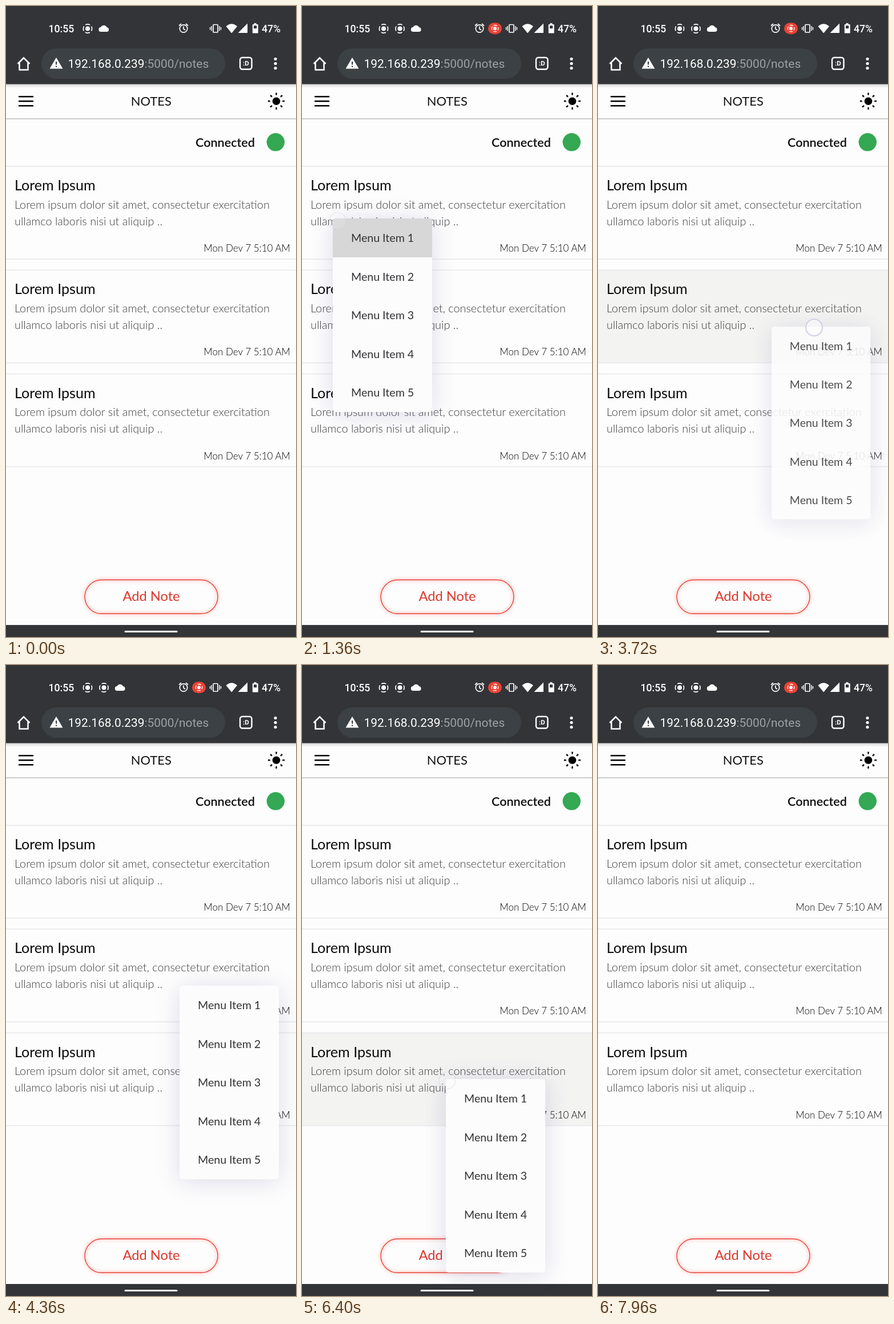
Animation, 508 px wide and 1102 px high, one loop 8000 ms. Source, as an HTML page:

```html
<!DOCTYPE html>
<html lang="en">
<head>
<meta charset="utf-8">
<title>Notes</title>
<style>
  html, body { margin: 0; width: 100%; height: 100%; overflow: hidden; background: #fdfdfd; }
  #stage { position: relative; width: 508px; height: 1102px; overflow: hidden; font-family: Lato, sans-serif; }
  svg { position: absolute; left: 0; top: 0; }
  .bar { font-family: Roboto, sans-serif; }
  .menu {
    position: absolute; width: 174px; border-radius: 5px; overflow: hidden;
    background: #fcfcfc; color: #333336; transform-origin: 0 0;
    box-shadow: 0 4px 40px rgba(85, 85, 150, .2);
  }
  .sub { width: 217px; }
  .menu div { height: 67.6px; line-height: 67px; padding-left: 32px; font-size: 19.6px; white-space: pre; }
  .touch {
    position: absolute; width: 27px; height: 27px; margin: -15px; border-radius: 50%;
    border: 2px solid #cfcfe8; background: rgba(255, 255, 255, .5);
  }
</style>
</head>
<body>
<div id="stage">
<svg width="508" height="1102" viewBox="0 0 508 1102">
  <defs>
    <g id="rec">
      <circle r="7.6" fill="none" stroke="currentColor" stroke-width="1.7" stroke-dasharray="8.4 3.54" stroke-dashoffset="4.2"/>
      <circle r="4" fill="currentColor"/>
    </g>
    <linearGradient id="edge" x2="0" y2="1">
      <stop stop-color="#d4d4d4"/><stop offset="1" stop-color="#fdfdfd"/>
    </linearGradient>
  </defs>
  <rect width="508" height="1102" fill="#fdfdfd"/>
  <rect y="136" width="508" height="7" fill="url(#edge)"/>
  <rect width="508" height="136.5" fill="#333438"/>

  <!-- status bar -->
  <g class="bar" fill="#fff" color="#fff" font-size="17.7" font-weight="500">
    <text x="74.5" y="46">10:55</text>
    <text x="448" y="46">47%</text>
    <use href="#rec" x="143" y="39.5"/>
    <use href="#rec" id="rec2" x="171.5" y="39.5"/>
    <path id="cloud" d="M-5 5.5a4 4 0 0 1-.3-8A5.6 5.6 0 0 1 5-2.2a3.9 3.9 0 0 1 .5 7.7z"/>
    <g fill="none" stroke="#fff" stroke-width="1.7">
      <circle cx="311" cy="39.5" r="6.7"/>
      <path d="M311 35.5v4.5l3 2M303 34.5l4-3.5M319 34.5l-4-3.5"/>
      <rect x="363" y="32.5" width="8" height="13.5" rx="1"/>
      <path d="M360 35v8.5M374 35v8.5M357.500 37v4.5M376.5 37v4.5" stroke-width="1.5"/>
    </g>
    <path d="M385.5 35.5q9.7-8.5 19.5 0L395.2 47.5zM423 30.5v16.5h-16.5z"/>
    <path d="M434.500 30h4v2h2.5q.7 0 .7.7v14q0 .8-.8.8h-8.3q-.8 0-.8-.8v-14q0-.7.7-.7h2zM434 34.2v5h5.2v-5z" fill-rule="evenodd"/>
    <g id="pill">
      <rect x="-12" y="-10" width="24" height="20" rx="10" fill="#ea4335"/>
      <use href="#rec" transform="scale(.75)"/>
    </g>
  </g>

  <!-- address bar -->
  <g class="bar" fill="#fff">
    <rect x="62" y="74" width="322" height="53" rx="26.5" fill="#3b4145"/>
    <path d="M20.5 101 31 90.5 41.5 101M23.5 99v12.5h15V99" fill="none" stroke="#fff" stroke-width="2.5"/>
    <path d="M88 90 99.5 109.5h-23zM87 97v5.5h2.2V97zm0 7.5v2.3h2.2v-2.3z" fill-rule="evenodd"/>
    <text x="108.5" y="108" font-size="20.9">192.168.0.239<tspan fill="#9da1a5">:5000/notes</tspan></text>
    <rect x="410" y="90" width="20.5" height="20.5" rx="4" fill="none" stroke="#fff" stroke-width="2.4"/>
    <text x="420.3" y="104.3" font-size="11.5" font-weight="700" text-anchor="middle">:D</text>
    <circle cx="472" cy="92.5" r="2.6"/><circle cx="472" cy="100.5" r="2.6"/><circle cx="472" cy="108.5" r="2.6"/>
  </g>

  <!-- page header -->
  <path d="M22 158.3h26M22 166.2h26M22 174.2h26" stroke="#000" stroke-width="2.5"/>
  <text x="254.3" y="173.5" font-size="21.9" text-anchor="middle" fill="#111">NOTES</text>
  <circle cx="473.5" cy="166.2" r="6.8"/>
  <circle cx="473.5" cy="166.2" r="12.6" fill="none" stroke="#000" stroke-width="4" pathLength="16" stroke-dasharray=".5 1.5" stroke-dashoffset=".25"/>
  <path d="M0 197h508" stroke="#bcbcb8" stroke-width="1.3"/>
  <text x="436" y="245.5" font-size="21.6" font-weight="600" text-anchor="end" fill="#0c0c0c">Connected</text>
  <circle cx="472.3" cy="237.8" r="15.7" fill="#34a853"/>

  <g id="notes"></g>

  <rect x="138" y="1002.3" width="233" height="59" rx="29.5" fill="none" stroke="#ea4236" stroke-width="1.4" style="filter:drop-shadow(0 0 3px rgba(240,60,45,.75))"/>
  <text x="254.5" y="1039" font-size="23.7" text-anchor="middle" fill="#da372c">Add Note</text>
  <rect y="1081" width="508" height="21" fill="#333438"/>
  <rect x="207.5" y="1091" width="93" height="3" rx="1.5" fill="#fff"/>
</svg>
</div>
<script>
const $ = id => document.getElementById(id);
const stage = $('stage');
const clamp = v => Math.max(0, Math.min(1, v));
// rises from a over `rise` ms, falls from b over `fall` ms
const pulse = (t, a, b, rise, fall) => Math.min(clamp((t - a) / rise), clamp(1 - (t - b) / fall));

$('notes').innerHTML = [0, 1, 2].map(i => `
  <g transform="translate(0 ${280 + i * 181.3})">
    <rect class="press" width="508" height="162" fill="#f3f3f2"/>
    <path d="M0 0h508M0 162h508" stroke="#e7e7eb" stroke-width="1.5"/>
    <text x="15" y="42" font-size="25.1" fill="#0c0c0c">Lorem Ipsum</text>
    <g font-size="19.85" font-weight="300" fill="#3c3c3c">
      <text x="15" y="73.5">Lorem ipsum dolor sit amet, consectetur exercitation</text>
      <text x="15" y="102.5">ullamco laboris nisi ut aliquip ..</text>
    </g>
    <text x="498" y="149" font-size="17" font-weight="300" fill="#000" text-anchor="end">Mon Dev 7 5:10 AM</text>
  </g>`).join('');
const cards = document.querySelectorAll('.press');

function add(cls, x, y, html = '') {
  const el = document.createElement('div');
  el.className = cls;
  el.style.left = x + 'px';
  el.style.top = y + 'px';
  el.innerHTML = html;
  return stage.appendChild(el);
}
const items = label => [1, 2, 3, 4, 5].map(n => `<div>${label} ${n}</div>`).join('');

// x, y, open time, close time, nested
const menus = [
  [54, 371, 1130, 2385],
  [225, 506, 1760, 2324, true],
  [304, 560, 3546, 5765],
  [90, 695, 5310, 5735, true],
  [252, 723, 6170, 7700]
].map(([x, y, open, close, nested]) => ({
  open, close, nested,
  el: add(nested ? 'menu sub' : 'menu', x, y, items(nested ? 'Sub-Menu Item' : 'Menu Item'))
}));

// note press spans
const presses = [[700, 1180], [3150, 3850], [5880, 6400]];

// menu, row, from, to
const hovers = [[0, 0, 1200, 1690], [0, 2, 1690, 2700], [2, 2, 5240, 6000]];

// x, y, down, up
const touches = [
  [62, 375, 690, 1210], [140, 540, 1660, 1740], [421, 453, 2290, 2400],
  [378, 561, 3140, 3800], [390, 728, 5210, 5290], [254, 725, 5870, 6260]
].map(([x, y, down, up]) => ({ down, up, el: add('touch', x, y) }));

function draw(t) {
  const rec = clamp((t - 300) / 250), ease = 1 - (1 - rec) ** 2;
  $('rec2').style.opacity = rec;
  $('cloud').setAttribute('transform', `translate(${171.5 + 28.5 * ease} 39.5)`);
  $('pill').setAttribute('transform', `translate(338 39.2) scale(${ease})`);

  presses.forEach(([a, b], i) => cards[i].style.opacity = pulse(t, a, b, 180, 150));

  for (const { el, open, close, nested } of menus) {
    const shown = pulse(t, open, close, 200, 200);
    const scale = nested ? 1 : 1 - .3 * (1 - clamp((t - open) / 200)) ** 2;
    el.style.opacity = shown;
    el.style.transform = scale < 1 ? `scale(${scale})` : 'none';
  }
  for (const [m, row, a, b] of hovers) {
    const on = pulse(t, a, b, 80, 80);
    menus[m].el.children[row].style.background = `rgba(0,0,0,${.15 * on})`;
  }
  for (const { el, down, up } of touches) el.style.opacity = pulse(t, down, up, 40, 200);
}

function tick() {
  draw(performance.now() % 8000);
  requestAnimationFrame(tick);
}
tick();
</script>
</body>
</html>
```
